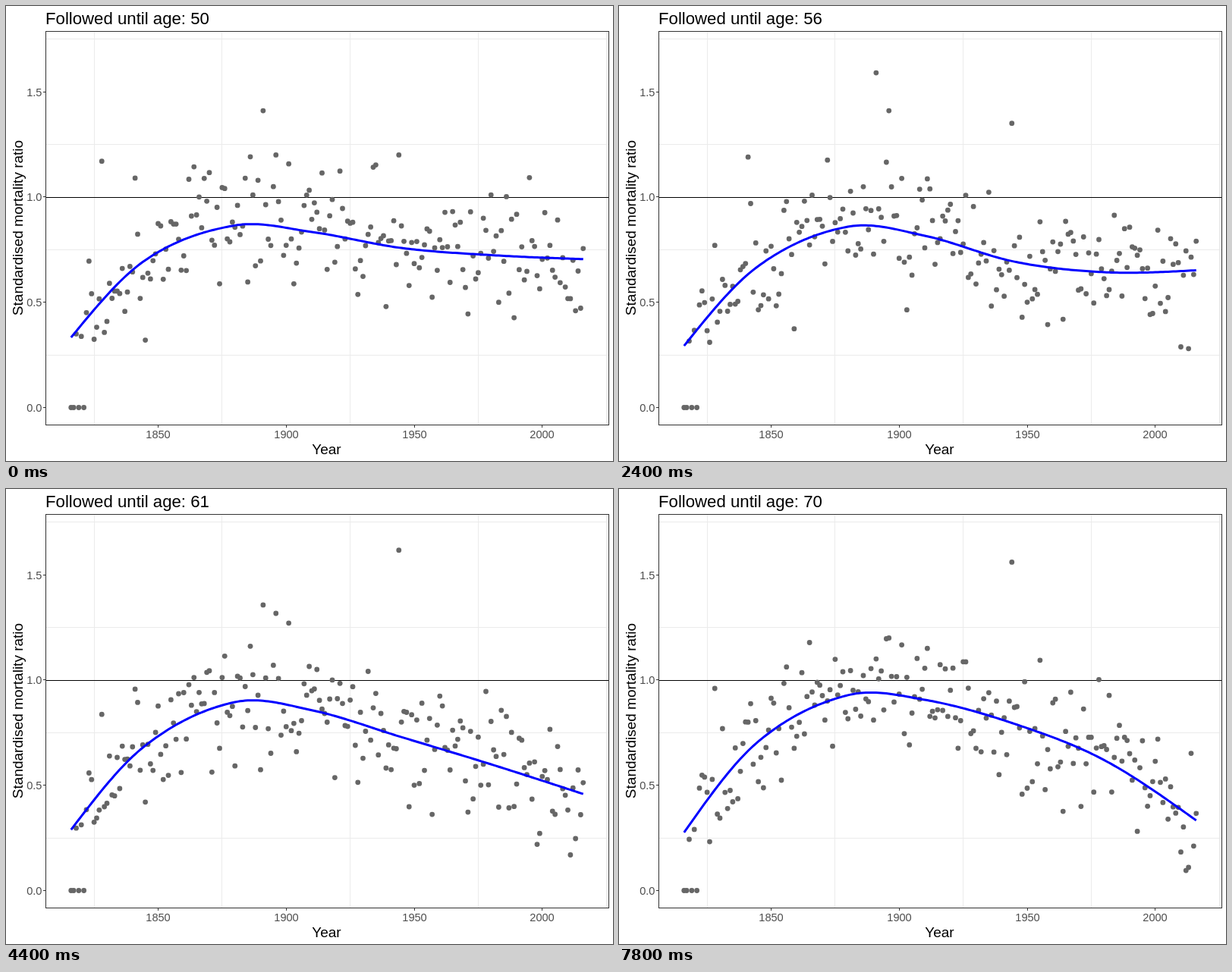
Animation, 800 px wide and 600 px high, one loop 8000 ms. Source, as an HTML page:

```html
<!DOCTYPE html>
<html lang="en">
<head>
<meta charset="utf-8">
<title>Mortality ratio by year</title>
<style>
  html, body { margin: 0; width: 100%; height: 100%; overflow: hidden; background: #fff; }
  svg { display: block; width: 800px; height: 600px; font-family: "Liberation Sans", Arial, sans-serif; }
  .grid { stroke: #ebebeb; }
  .rule { stroke: #333; }
  .tick { font-size: 14.6px; fill: #4d4d4d; }
  .axis { font-size: 19px; text-anchor: middle; }
  #title { font-size: 22.2px; }
  #dots { fill: #666; }
  #curve { fill: none; stroke: #00f; stroke-width: 3; stroke-linejoin: round; }
</style>
</head>
<body>
<svg viewBox="0 0 800 600">
  <clipPath id="panel"><rect x="52" y="33" width="743" height="520"/></clipPath>
  <g id="grid"></g>
  <g clip-path="url(#panel)">
    <path d="M52 252.5H794" stroke="#000"/>
    <g id="dots"></g>
    <path id="curve"/>
  </g>
  <rect x="52.5" y="33.5" width="742" height="519" fill="none" class="rule"/>
  <g id="ticks"></g>
  <text id="title" x="52" y="24"></text>
  <text class="axis" x="422.5" y="591">Year</text>
  <text class="axis" transform="translate(21.5 292.5) rotate(-90)">Standardised mortality ratio</text>
</svg>
<script>
const $ = id => document.getElementById(id);
const xOf = year => 200.5 + 3.375 * (year - 1850);
const yOf = ratio => 529.5 - 277.6 * ratio;
const crisp = v => Math.floor(v) + 0.5;
const lerp = (a, b, u) => a + (b - a) * u;

function add(parent, tag, attrs, text = "") {
  const el = document.createElementNS("http://www.w3.org/2000/svg", tag);
  for (const key in attrs) el.setAttribute(key, attrs[key]);
  el.textContent = text;
  return parent.appendChild(el);
}

// Ratios at these ages, linear in between: the curve's bends, then the outliers.
const ages = [50, 56, 63.5, 66.5, 69.5];
const bends = {
  1816: [0.333, 0.293, 0.287, 0.287, 0.276],
  1845: [0.7, 0.672, 0.697, 0.69, 0.708],
  1880: [0.865, 0.859, 0.913, 0.908, 0.928],
  1910: [0.834, 0.816, 0.877, 0.888, 0.906],
  1945: [0.758, 0.693, 0.747, 0.776, 0.792],
  1980: [0.724, 0.643, 0.578, 0.596, 0.62],
  2016: [0.705, 0.652, 0.362, 0.286, 0.333]
};
const outliers = {
  1828: [1.17, 0.77, 0.87, 0.94, 0.96],
  1841: [1.09, 1.19, 0.84, 0.83, 0.8],
  1891: [1.41, 1.59, 1.24, 1.07, 1.1],
  1896: [1.2, 1.41, 1.27, 1.18, 1.2],
  1944: [1.2, 1.35, 1.75, 1.85, 1.56],
  2013: [0.46, 0.28, 0.23, 0, 0.11]
};
const emptyYears = [1816, 1817, 1819, 1821];
const bendYears = Object.keys(bends).map(Number);

function segment(knots, v) {
  let i = 0;
  while (i < knots.length - 2 && v > knots[i + 1]) i++;
  return i;
}

function atAge(values, age) {
  const i = segment(ages, age);
  return lerp(values[i], values[i + 1], (age - ages[i]) / (ages[i + 1] - ages[i]));
}

// Smooth curve through the bends, with no curvature at its two ends.
function curveAt(age) {
  const t = bendYears, last = t.length - 1;
  const r = t.map(year => atAge(bends[year], age));
  const chord = (a, b) => (r[b] - r[a]) / (t[b] - t[a]);
  const m = t.map((_, i) => i > 0 && i < last ? chord(i - 1, i + 1) : 0);
  m[0] = 1.5 * chord(0, 1) - 0.5 * m[1];
  m[last] = 1.5 * chord(last - 1, last) - 0.5 * m[last - 1];
  return year => {
    const i = segment(t, year), w = t[i + 1] - t[i];
    const u = (year - t[i]) / w, v = 1 - u;
    return v * v * (1 + 2 * u) * r[i] + u * u * (1 + 2 * v) * r[i + 1]
      + w * u * v * (v * m[i] - u * m[i + 1]);
  };
}

function hash(a, b) {
  const s = Math.sin(a * 12.9898 + b * 78.233) * 43758.5453;
  return s - Math.floor(s);
}
const bell = (year, seed) => 2 * (hash(year, seed) + hash(year, seed + 0.3) + hash(year, seed + 0.6) - 1.5);

function wander(year, t, seed) {
  const k = Math.floor(t);
  return lerp(bell(year, seed + k), bell(year, seed + k + 1), t - k);
}

// Each year keeps an offset from the curve, drifts slowly and jitters with every age.
function scatter(year, age) {
  const spread = Math.min(1, 0.6 + (year - 1816) / 120);
  return spread * (0.12 * bell(year, 7) + 0.11 * wander(year, age / 3, 100) + 0.05 * wander(year, age, 200));
}

for (let year = 1825; year <= 2025; year += 50)
  add($("grid"), "path", { class: "grid", d: `M${crisp(xOf(year))} 34V552` });
for (let ratio = 0.25; ratio < 2; ratio += 0.5)
  add($("grid"), "path", { class: "grid", d: `M53 ${crisp(yOf(ratio))}H794` });

for (let year = 1850; year <= 2000; year += 50) {
  const x = crisp(xOf(year));
  add($("ticks"), "path", { class: "rule", d: `M${x} 553v3` });
  add($("ticks"), "text", { class: "tick", x, y: 570, "text-anchor": "middle" }, year);
}
for (let ratio = 0; ratio < 2; ratio += 0.5) {
  const y = crisp(yOf(ratio));
  add($("ticks"), "path", { class: "rule", d: `M49 ${y}h3` });
  add($("ticks"), "text", { class: "tick", x: 47.5, y: y + 5.5, "text-anchor": "end" }, ratio.toFixed(1));
}

const dots = Array.from({ length: 201 }, (_, i) => {
  const year = 1816 + i;
  return { year, el: add($("dots"), "circle", { cx: xOf(year), r: 3.4 }) };
});

function ratioOf(year, age, trend) {
  if (emptyYears.includes(year)) return 0;
  if (outliers[year]) return atAge(outliers[year], age);
  return Math.max(0.09, trend + scatter(year, age));
}

function draw(step) {
  const age = 50 + step / 2, curve = curveAt(age);
  const path = dots.map(({ year, el }) => {
    const trend = curve(year);
    el.setAttribute("cy", yOf(ratioOf(year, age, trend)).toFixed(1));
    return `${xOf(year)} ${yOf(trend).toFixed(2)}`;
  });
  $("curve").setAttribute("d", "M" + path.join("L"));
  $("title").textContent = "Followed until age: " + Math.round(50 + step * 50 / 99);
}

let shown = -1;
function tick() {
  const step = Math.floor(performance.now() % 8000 / 200);
  if (step !== shown) draw(shown = step);
  requestAnimationFrame(tick);
}
tick();
</script>
</body>
</html>
```
